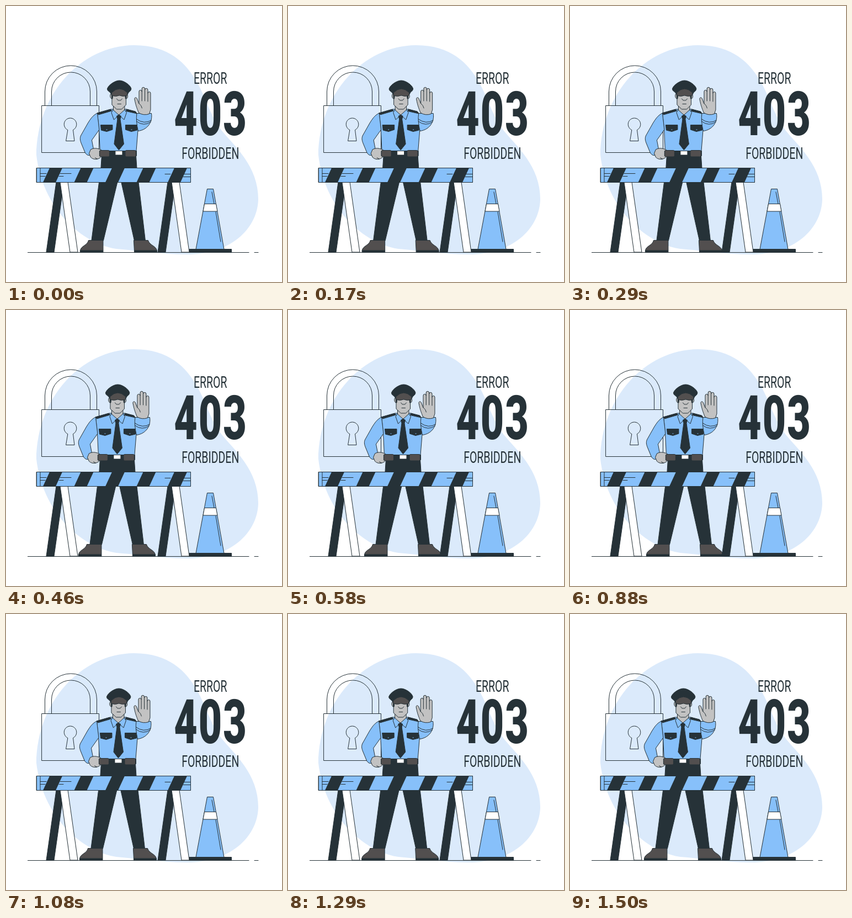
Recreate the animation shown at these times as an HTML page. Size 500 by 500 pixels, loop 1540 ms.

```html
<!DOCTYPE html>
<html lang="en">
<head>
<meta charset="utf-8">
<title>Error 403</title>
<style>
  html, body { margin: 0; height: 100%; overflow: hidden; background: #fff; }
  svg { display: block; width: 100%; height: 100%; }
  .line { fill: none; stroke: #263238; stroke-linecap: round; stroke-linejoin: round; }
  .dark { fill: #263238; stroke: #263238; stroke-linejoin: round; }
  .blue { fill: #87c0fa; stroke: #263238; stroke-linejoin: round; }
  .white { fill: #fff; stroke: #263238; stroke-linejoin: round; }
  .skin { fill: #c2c2c2; stroke: #263238; stroke-linejoin: round; }
  .leather { fill: #524f4f; stroke: #263238; stroke-linejoin: round; }
  text { font: 400 29.5px Roboto, sans-serif; fill: #263238; text-anchor: middle; }
  .code { font-size: 111px; font-weight: 900; letter-spacing: 3px; }
</style>
</head>
<body>
<svg viewBox="0 0 500 500">
  <defs>
    <g id="trestle">
      <path class="dark" d="M91 319H105L87 446H73Z"/>
      <path class="white" d="M98 319H112L130 446H116Z"/>
    </g>
    <path id="stripe" fill="#263238" d="M79 293.5h23l-12 26h-23Z"/>
  </defs>

  <path fill="#dbeafb" d="M232 71C296 71 326 105 343 133C361 162 370 200 391 226C414 254 457 290 457 350C456 400 412 447 335 450C290 451 250 444 200 440C135 430 66 365 55 270C56 160 135 72 232 71Z"/>
  <path class="line" d="M39.5 446.5H440M450 446.5H457"/>

  <!-- padlock -->
  <path class="line" d="M65 180.5H168.5V265.5H65ZM70.5 180V155A47 47 0 0 1 164.5 155V180M82.5 180V155A35 35 0 0 1 152.5 155V180M111.5 224.5A11.3 11.3 0 1 1 121.5 224.5L124 244.5H109Z"/>

  <!-- lettering in one condensed cut -->
  <g transform="scale(.66 1)">
    <text x="561" y="141">ERROR</text>
    <text x="562" y="234" class="code">403</text>
    <text x="561" y="277">FORBIDDEN</text>
  </g>

  <!-- traffic cone -->
  <path class="blue" d="M364.5 331.5H375.5L395 440.5H344Z"/>
  <path class="white" d="M359.5 358.5H380.5L383 372H357Z"/>
  <path class="line" d="M373 337L377 358M380 373L389 427"/>
  <path class="dark" d="M332 440.5H408.5V446H332Z"/>

  <g id="officer">
    <path class="dark" d="M173 270H235L236.5 293L252 425H232L205 304L176 425H154.5L171.5 293Z"/>
    <g class="leather">
      <path d="M149 424.5H175.5V443H134C135.500 434 147 434 149 424.5Z"/>
      <path d="M231 424.5H257C260 434 271 434 273 443H232Z"/>
    </g>
    <path class="dark" d="M134 443H175.5V446.5H134ZM232 443H273V446.5H232Z"/>

    <!-- shirt -->
    <path class="blue" d="M190 187H218L235 192L241 208L238.5 226L235.5 263H170L168 222L165 194Z"/>
    <path class="blue" d="M165 194C157 198 153 204 148 212L135 235C133 240 134 244 136 249L143 266Q147 272 152 270Q151 263 158 259L155 243L168.5 224Z"/>
    <path class="skin" d="M153 260C160 256 168 258 174 262L172 273C167 279 158 279 153 274L150 267Z"/>
    <path class="line" d="M161 275L165 277"/>
    <path class="dark" d="M164.5 194L189 187L191 190L167 197Z"/>
    <path class="dark" d="M218 187L234 191L237 195L217 190.5Z"/>
    <g class="dark">
      <path d="M171 215.5H192.5V224L182 227.5L172 225Z"/>
      <path d="M216 215.5H237.5L237 225L226.5 227.5L216 224Z"/>
    </g>
    <path stroke="#87c0fa" d="M181 224h2M226 224h2"/>

    <!-- belt -->
    <path class="dark" d="M169 262.5H236V271.5H169Z"/>
    <g class="leather">
      <rect x="169" y="261.5" width="18" height="11.5" rx="2"/>
      <rect x="215.5" y="261.5" width="19.5" height="11.5" rx="2"/>
    </g>
    <rect class="white" x="197.5" y="262.5" width="13" height="7.5"/>

    <!-- head -->
    <path class="skin" d="M194 178H214.5V190L204 199L194 190Z"/>
    <path class="blue" d="M193.5 188L204 197.5L195 206L190.5 193Z"/>
    <path class="blue" d="M214.5 188L204 197.5L213.5 206L218 193Z"/>
    <path class="dark" d="M204 197L208 199.5L206.5 205L213 250L204 261L195.5 250L201.5 205L200 199.5Z"/>
    <path class="skin" d="M190 159C187 160 188 168 191.5 168V179L200 187H209L217 179V168C221 168 221 160 218 159Z"/>
    <path class="dark" d="M190.5 158H193.5L192.5 168H191ZM218 158H215L216 168H217.5Z"/>
    <path class="line" d="M200 168Q202 172 205 171Q208 172 210 168M201.5 177.5H208"/>
    <path class="dark" d="M183 150C185 143 197 135 205 135C213 135 225 143 226.5 150C226 155 221 155 220 160H190C189 155 183 155 183 150Z"/>
    <path class="leather" d="M191 157Q205 143 219.5 157L219 162Q212 165 205 162Q198 165 191 162Z"/>

    <!-- raised hand -->
    <path class="blue" d="M236.5 194.5H263C265.5 209 257 224 239 226.5Q234.5 208 236.5 194.5Z"/>
    <path class="line" d="M236 205Q250 215 263 207M236 209Q249 219 262 210"/>
    <path class="skin" d="M240 193.5C237.5 187 235 182 232.5 169C232 165 236 165 237 168L240.5 177V155a2.6 2.6 0 0 1 5.2 0V150a2.7 2.7 0 0 1 5.4 0V152a2.7 2.7 0 0 1 5.4 0V158a2.5 2.5 0 0 1 5 0V188L259 195.5Q249 199 240 193.5Z"/>
    <path class="line" d="M245.7 155V172M251.1 152V172M256.5 158V173M241 177Q245 180 246 185"/>
  </g>

  <!-- barrier -->
  <use href="#trestle"/>
  <use href="#trestle" x="202"/>
  <path class="blue" d="M55.5 293.5H334.5V319.5H55.5Z"/>
  <use href="#stripe"/>
  <use href="#stripe" x="56.5"/>
  <use href="#stripe" x="113"/>
  <use href="#stripe" x="169.5"/>
  <use href="#stripe" x="226"/>
  <path class="line" d="M62 293.5V319.5M62 303.5H73M62 308.5H71M98 303.5H118M96 308.5H104M288 304.5H298M323 304.5H334M321 309.5H334M55.5 293.5H334.5V319.5H55.5Z"/>
</svg>

<script>
  const LOOP = 1540, SHAKE = 1500, FPS = 24, LEAD = 15, REST = .5;
  const stops = [0, -1, 2, -4, 4, -4, 4, -4, 2, -1, 0];
  const officer = document.getElementById('officer');

  const bezier = (a, b, s) => 3 * a * s * (1 - s) ** 2 + 3 * b * s * s * (1 - s) + s ** 3;

  // cubic-bezier(.36, .07, .19, .97)
  function ease(x) {
    let lo = 0, hi = 1;
    for (let i = 0; i < 20; i++) {
      const mid = (lo + hi) / 2;
      if (bezier(.36, .19, mid) < x) lo = mid; else hi = mid;
    }
    return bezier(.07, .97, lo);
  }

  function shift(ms) {
    const pos = (ms % SHAKE) / SHAKE * 10, i = Math.floor(pos);
    return REST + stops[i] + (stops[i + 1] - stops[i]) * ease(pos - i);
  }

  function draw() {
    const step = Math.floor((performance.now() % LOOP + 5) * FPS / 1000);
    const x = shift(step * 1000 / FPS + LEAD);
    officer.setAttribute('transform', `translate(${x.toFixed(3)} 0)`);
    requestAnimationFrame(draw);
  }
  draw();
</script>
</body>
</html>
```
